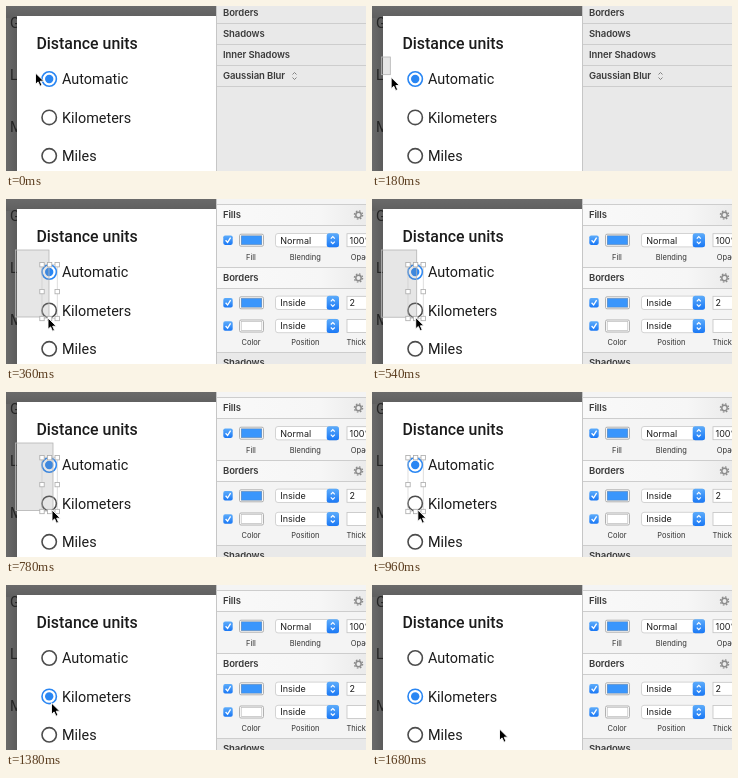
Write an HTML page that moves like this. It is 360x165 px and loops after 2.68 s.

```html
<!DOCTYPE html>
<html lang="en">
<head>
<meta charset="utf-8">
<title>Distance units</title>
<style>
html, body { margin: 0; width: 100%; height: 100%; overflow: hidden; background: #fff; }
svg { display: block; width: 100vw; height: 100vh; }
text { white-space: pre; }
.dialog { font: 14.4px Roboto, sans-serif; fill: #1c1c1c; }
.title { font-size: 15.9px; font-weight: 500; }
.panel { font: 9px Inter, sans-serif; fill: #1c1c1c; }
.head { font-size: 9.5px; font-weight: 600; letter-spacing: -.1px; fill: #3a3a3a; }
.label { font-size: 7.5px; fill: #333; text-anchor: middle; }
</style>
</head>
<body>
<svg id="stage" viewBox="0 0 360 165" preserveAspectRatio="none">
  <defs>
    <linearGradient id="shade"><stop stop-color="#6a6a6a"/><stop offset="1" stop-color="#5a5a5a"/></linearGradient>
    <linearGradient id="shadeTop" x2="0" y2="1"><stop stop-color="#6a6a6a"/><stop offset="1" stop-color="#5f5f5f"/></linearGradient>
    <linearGradient id="blue" x2="0" y2="1"><stop stop-color="#5dacfb"/><stop offset="1" stop-color="#1a78f5"/></linearGradient>
    <linearGradient id="header"><stop stop-color="#f9f9f9"/><stop offset=".7" stop-color="#f6f6f6"/><stop offset="1" stop-color="#ebebeb"/></linearGradient>
  </defs>
  <g class="dialog">
    <rect width="12" height="165" fill="url(#shade)"/>
    <rect width="210" height="12" fill="url(#shadeTop)"/>
    <g fill="#252525">
      <text x="4" y="22">G</text><text x="4" y="74">L</text><text x="4" y="126">M</text>
    </g>
    <rect x="11" y="10" width="199" height="155" fill="#fff"/>
    <text class="title" x="30.4" y="42.5">Distance units</text>
    <g id="options"></g>
  </g>
  <g class="panel" id="closed"></g>
  <g class="panel" id="open"></g>
  <rect x="210" width="1" height="165" fill="#c6c6c6"/>
  <rect id="marquee" fill="#8c8c8c" fill-opacity=".22" stroke="#b4b4b4" stroke-width=".8"/>
  <g id="handles" fill="#fff" stroke="#aaa" stroke-width=".8">
    <rect x="36" y="65.7" width="15.2" height="53.8" fill="none" stroke="#c8c8c8" stroke-width=".6"/>
  </g>
  <path id="cursor" d="M0 0V11.3L2.6 8.9L4.5 13.2L6.5 12.3L4.7 8.2H8.3Z" fill="#000" stroke="#fff" stroke-width=".9"/>
</svg>
<script>
const $ = id => document.getElementById(id);
const add = (id, markup) => $(id).insertAdjacentHTML('beforeend', markup);
const show = (id, on) => $(id).setAttribute('visibility', on ? 'visible' : 'hidden');

const text = (x, y, s, cls = '') => `<text x="${x}" y="${y}" class="${cls}">${s}</text>`;
const box = (x, y, w, h, fill, extra = '') =>
  `<rect x="${x}" y="${y}" width="${w}" height="${h}" fill="${fill}" ${extra}/>`;
const rule = y => box(210, y, 150, 1, '#cdcdcd');
const chevrons = (x, y, color, w = 1) =>
  `<path d="M${x - 2} ${y - 1.5}l2-2 2 2M${x - 2} ${y + 1.5}l2 2 2-2" fill="none" stroke="${color}" stroke-width="${w}"/>`;
const gear = y => `<g fill="none" stroke="#8c8c8c"><circle cx="352.5" cy="${y}" r="2.7" stroke-width="1.5"/>
  <circle cx="352.5" cy="${y}" r="4.1" stroke-width="1.3" stroke-dasharray="1.6 1.62"/></g>`;

// Radio options
['Automatic', 'Kilometers', 'Miles'].forEach((name, i) => {
  const y = 73 + i * 38.4;
  add('options', `<g class="radio"><circle cx="43.2" cy="${y}" r="7.2" fill="none" stroke-width="1.6"/>
    <circle cx="43.2" cy="${y}" r="4.2" fill="#2986f3" stroke="none"/></g>` + text(56, y + 5.4, name));
});
const radios = [...document.querySelectorAll('.radio')];
function select(n) {
  radios.forEach((r, i) => {
    r.setAttribute('stroke', i === n ? '#2986f3' : '#4c4c4c');
    r.lastElementChild.setAttribute('visibility', i === n ? 'visible' : 'hidden');
  });
}

// Inspector with nothing selected
const collapsed = (y, s) => box(210, y, 150, 21, '#e9e9e9') + rule(y) + rule(y + 21) +
  text(217, y + 14.3, s, 'head');
add('closed', box(210, 0, 150, 165, '#e9e9e9') +
  ['Borders', 'Shadows', 'Inner Shadows', 'Gaussian Blur']
    .map((s, i) => collapsed(-4 + i * 21, s)).join('') +
  chevrons(288.5, 70, '#777', .9));

// Inspector with a selection
const header = (y, s) => box(210, y, 150, 21, 'url(#header)') + rule(y) + rule(y + 21) +
  text(217, y + 14.2, s, 'head') + gear(y + 11);
const row = (y, color, menu, value) =>
  box(217.3, y - 4.7, 9.4, 9.4, 'url(#blue)', 'rx="1.8"') +
  `<path d="M219.6 ${y}l2 2.2 3-4.8" fill="none" stroke="#fff" stroke-width="1.3"/>` +
  box(233.5, y - 6, 24, 12, '#fff', 'stroke="#a9a9a9" stroke-width=".9" rx="1.5"') +
  box(235.2, y - 4.5, 20.6, 9, color, 'stroke="#555" stroke-opacity=".4" stroke-width=".7"') +
  box(269.5, y - 6.7, 63, 13.4, '#fff', 'rx="2.5" stroke="#c9c9c9" stroke-width=".8"') +
  box(320.7, y - 7, 12.3, 14, 'url(#blue)', 'rx="2.5"') + chevrons(326.8, y, '#fff', 1.2) +
  text(274.3, y + 3.3, menu) +
  box(341, y - 6.5, 30, 13, '#fff', 'stroke="#c3c3c3" stroke-width=".8"') + text(343.5, y + 3.3, value);
const labels = (y, a, b, c) =>
  text(245, y, a, 'label') + text(299.3, y, b, 'label') + text(358.5, y, c, 'label');

add('open', box(210, 0, 150, 165, '#f4f4f4') + header(5, 'Fills') +
  row(41.2, '#3a96fc', 'Normal', '100%') + labels(60.5, 'Fill', 'Blending', 'Opacity') +
  header(68, 'Borders') + row(103.8, '#3a96fc', 'Inside', '2') + row(127, '#fff', 'Inside', '') +
  labels(146, 'Color', 'Position', 'Thickness') + collapsed(153, 'Shadows'));

// Selection handles
for (const y of [65.7, 92.6, 119.5])
  for (const x of [36, 43.6, 51.2])
    if (x !== 43.6 || y !== 92.6) add('handles', box(x - 2.2, y - 2.2, 4.4, 4.4, '#fff'));

// Motion: [time, x, y]
const LOOP = 2680, STEP = 60, LAST = 1680;
const path = [[0, 29.5, 67], [120, 9.5, 51], [300, 38.5, 112], [360, 42, 119], [780, 46, 118],
  [1380, 45.5, 118], [1680, 127.5, 144]];
const drag = [[120, 9.5, 51], [300, 36, 104], [360, 43, 118], [780, 47, 118.5], [900, 47, 118.5]];
const smooth = u => u * u * (3 - 2 * u);

function at(keys, t) {
  const i = keys.findIndex(k => k[0] > t);
  if (i < 0) return keys[keys.length - 1].slice(1);
  if (i === 0) return keys[0].slice(1);
  const [t0, x0, y0] = keys[i - 1], [t1, x1, y1] = keys[i];
  let u = (t - t0) / (t1 - t0);
  if (t1 === LAST) u = smooth(u);
  return [x0 + (x1 - x0) * u, y0 + (y1 - y0) * u];
}

function draw(now) {
  const t = Math.min(Math.floor((now % LOOP) / STEP) * STEP, LAST);
  const [x, y] = at(path, t), [mx, my] = at(drag, t);
  $('cursor').setAttribute('transform', `translate(${x} ${y})`);
  $('marquee').setAttribute('x', 9.5);
  $('marquee').setAttribute('y', 51);
  $('marquee').setAttribute('width', mx - 9.5);
  $('marquee').setAttribute('height', my - 51);
  show('marquee', t > 120 && t < 900);
  show('handles', t >= 300 && t < 1260);
  show('closed', t < 360);
  show('open', t >= 360);
  select(t < 1140 ? 0 : 1);
}
function tick() {
  draw(performance.now());
  requestAnimationFrame(tick);
}
tick();
</script>
</body>
</html>
```
